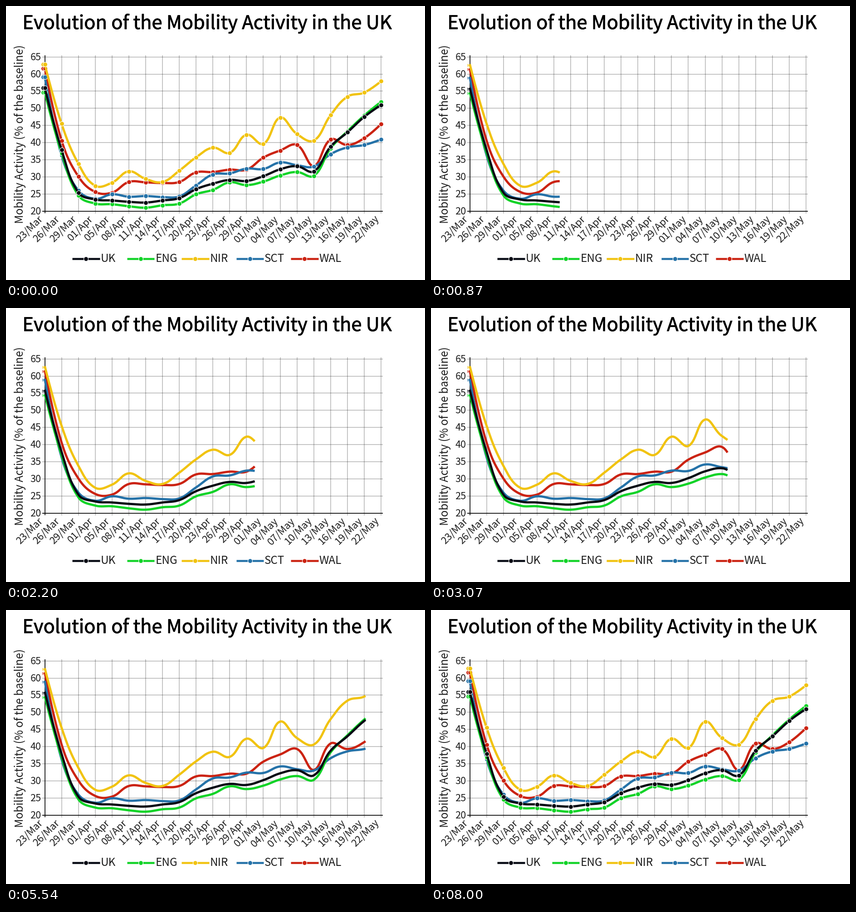
Write a matplotlib script that moves like this. It is 924 px wide and 606 px high and loops after 9.86 s.

```python
import numpy as np
import matplotlib.pyplot as plt
from matplotlib import patheffects
from matplotlib.animation import FuncAnimation
from matplotlib.collections import LineCollection

W, H, DPI = 924, 606, 96
PX = 72 / DPI                       # points per pixel
LOOP, INTERVAL = 9860, 34
START, STEP, LAST_STEP = 140, 1000 / 15, 118
LEFT, RIGHT, TOP, BOTTOM = 85.5, 827.0, 112.7, 453.6
INK = "#1c1c1c"

DATES = ("23/Mar 26/Mar 29/Mar 01/Apr 05/Apr 08/Apr 11/Apr 14/Apr 17/Apr 20/Apr "
         "23/Apr 26/Apr 29/Apr 01/May 04/May 07/May 10/May 13/May 16/May 19/May "
         "22/May").split()
TICKS = np.linspace(LEFT, RIGHT, len(DATES))

SERIES = {
    "UK": ("#070b14", [56.0, 37.9, 25.4, 23.4, 23.1, 22.7, 22.5, 23.1, 23.8, 26.4, 28.0,
                       29.1, 28.8, 30.2, 32.2, 33.1, 31.6, 38.8, 43.0, 47.5, 51.0]),
    "ENG": ("#12d328", [54.7, 36.9, 24.6, 22.2, 22.0, 21.4, 21.0, 21.7, 22.2, 24.9, 26.2,
                        28.4, 27.6, 28.6, 30.4, 31.4, 30.3, 38.3, 43.3, 47.9, 51.9]),
    "NIR": ("#f1c311", [62.9, 45.5, 33.8, 27.4, 28.3, 31.6, 29.4, 28.5, 31.8, 35.7, 38.5,
                        37.0, 42.3, 39.6, 47.3, 42.5, 40.6, 48.0, 53.4, 54.6, 57.9]),
    "SCT": ("#2572a8", [59.2, 36.3, 26.0, 23.6, 24.9, 24.2, 24.4, 24.1, 24.3, 27.5, 30.7,
                        31.0, 32.4, 32.3, 34.2, 33.4, 33.0, 36.6, 38.6, 39.3, 40.9]),
    "WAL": ("#cb2312", [61.7, 40.6, 30.1, 25.6, 25.4, 28.5, 28.4, 28.2, 28.5, 31.3, 31.4,
                        32.1, 32.1, 35.6, 37.7, 39.3, 33.2, 40.9, 39.3, 41.3, 45.4]),
}


def to_y(value):
    return TOP + (65 - np.asarray(value)) * (BOTTOM - TOP) / 45


def smooth_curve(points, tension=0.4, samples=24):
    """Bezier spline whose handles are weighted by neighbour distance."""
    before = np.vstack([points[:1], points[:-1]])
    after = np.vstack([points[1:], points[-1:]])
    d_in = np.linalg.norm(points - before, axis=1)
    d_out = np.linalg.norm(after - points, axis=1)
    weight = (d_in / (d_in + d_out))[:, None]
    handle_in = points - tension * weight * (after - before)
    handle_out = points + tension * (1 - weight) * (after - before)
    handle_in[-1], handle_out[0] = points[-1], points[0]
    u = np.linspace(0, 1, samples, endpoint=False)[:, None]
    parts = [(1 - u) ** 3 * a + 3 * u * (1 - u) ** 2 * b + 3 * u * u * (1 - u) * c + u ** 3 * d
             for a, b, c, d in zip(points[:-1], handle_out[:-1], handle_in[1:], points[1:])]
    return np.vstack(parts + [points[-1:]])


# The reveal eases out: its remaining distance decays, interpolated in log space.
KNOT_T = np.array([140, 870, 2200, 3070, 4400, 6940, 7940])
KNOT_X = np.array([LEFT, 283, 547.5, 653.5, 747.5, 820, 825.8])
DECAY = -np.log((RIGHT - KNOT_X) / (RIGHT - LEFT))
SLOPE = np.gradient(DECAY, KNOT_T)


def front_at(t):
    k = min(np.searchsorted(KNOT_T, t, side="right") - 1, len(KNOT_T) - 2)
    span = KNOT_T[k + 1] - KNOT_T[k]
    u = (t - KNOT_T[k]) / span
    decay = ((1 + 2 * u) * (1 - u) ** 2 * DECAY[k] + u * (1 - u) ** 2 * span * SLOPE[k]
             + u * u * (3 - 2 * u) * DECAY[k + 1] + u * u * (u - 1) * span * SLOPE[k + 1])
    return RIGHT - (RIGHT - LEFT) * np.exp(-decay)


fig = plt.figure(figsize=(W / DPI, H / DPI), dpi=DPI, facecolor="white")
ax = fig.add_axes([0, 0, 1, 1])
ax.set(xlim=(0, W), ylim=(H, 0))
ax.axis("off")


def label(x, y, text, size, **style):
    style = {"color": INK, "va": "baseline", "rotation_mode": "anchor", **style}
    return ax.text(x, y, text, fontsize=size * PX, family="Noto Sans CJK JP", **style)


def dots(x, y, color, z):
    return ax.plot(x, y, "o", ms=10 * PX, mfc=color, mec="white", mew=1.1 * PX, zorder=z)[0]


# Title, grid and axes
title = label(443.5, 51, "Evolution of the Mobility Activity in the UK", 41.7,
              ha="center", color="black")
title.set_path_effects([patheffects.withStroke(linewidth=0.9 * PX, foreground="black")])
label(38.5, 283, "Mobility Activity (% of the baseline)", 24.2, ha="center", rotation=90)

levels = np.arange(20, 66, 5)
grid = [[(80, y), (831, y)] for y in to_y(levels)] + [[(x, 109), (x, 459)] for x in TICKS]
ax.add_collection(LineCollection(grid, colors=[(0, 0, 0, 0.3)], linewidths=1.5 * PX, zorder=1))
axes_lines = [[(LEFT, 109), (LEFT, 458)], [(80, BOTTOM), (831, BOTTOM)]]
ax.add_collection(LineCollection(axes_lines, colors="black", linewidths=1.6 * PX, zorder=1))

for level, y in zip(levels, to_y(levels)):
    label(77.5, y + 7, str(level), 21.7, ha="right")
for x, date in zip(TICKS, DATES):
    label(x - 3.5, 472, date, 22, ha="right", rotation=45)

# Series, the first one on top
curves, lines, markers, stubs = [], [], [], []
for i, (name, (color, values)) in enumerate(SERIES.items()):
    y = to_y(values)
    z = 10 - i
    curves.append(smooth_curve(np.column_stack([TICKS, y])))
    lines.append(ax.plot([], [], color=color, lw=5 * PX, solid_capstyle="butt",
                         solid_joinstyle="round", zorder=z)[0])
    markers.append(dots(np.r_[82, TICKS], np.r_[y[0], y], color, z + 0.5))
    stub = [[(80.6, y[0]), (81.6, y[0] + 6)], [(83, y[0] + 1), (83.4, y[0] + 4)]]
    stubs.append(ax.add_collection(LineCollection(stub, colors=color, linewidths=1.2 * PX,
                                                  zorder=z)))
    mid = 176 + 120.5 * i
    ax.plot([mid - 30, mid + 30.5], [559, 559], color=color, lw=4.5 * PX,
            solid_capstyle="butt")
    dots([mid], [559], color, 3)
    label(mid + 32.5, 566.5, name, 24.3)


def update(frame):
    # The picture advances 15 times a second
    step = int(((frame + 1) * INTERVAL - START) // STEP)
    done = step < 0 or step >= LAST_STEP
    front = RIGHT if done else front_at(START + step * STEP)
    for curve, line, dot, stub in zip(curves, lines, markers, stubs):
        shown = curve[curve[:, 0] < front]
        tip = (front, np.interp(front, curve[:, 0], curve[:, 1]))
        line.set_data(*np.vstack([shown, tip]).T)
        dot.set_visible(done)
        stub.set_visible(not done)
    return lines + markers + stubs


anim = FuncAnimation(fig, update, frames=LOOP // INTERVAL, interval=INTERVAL,
                     repeat=True, repeat_delay=0, blit=False)
plt.show()
```
